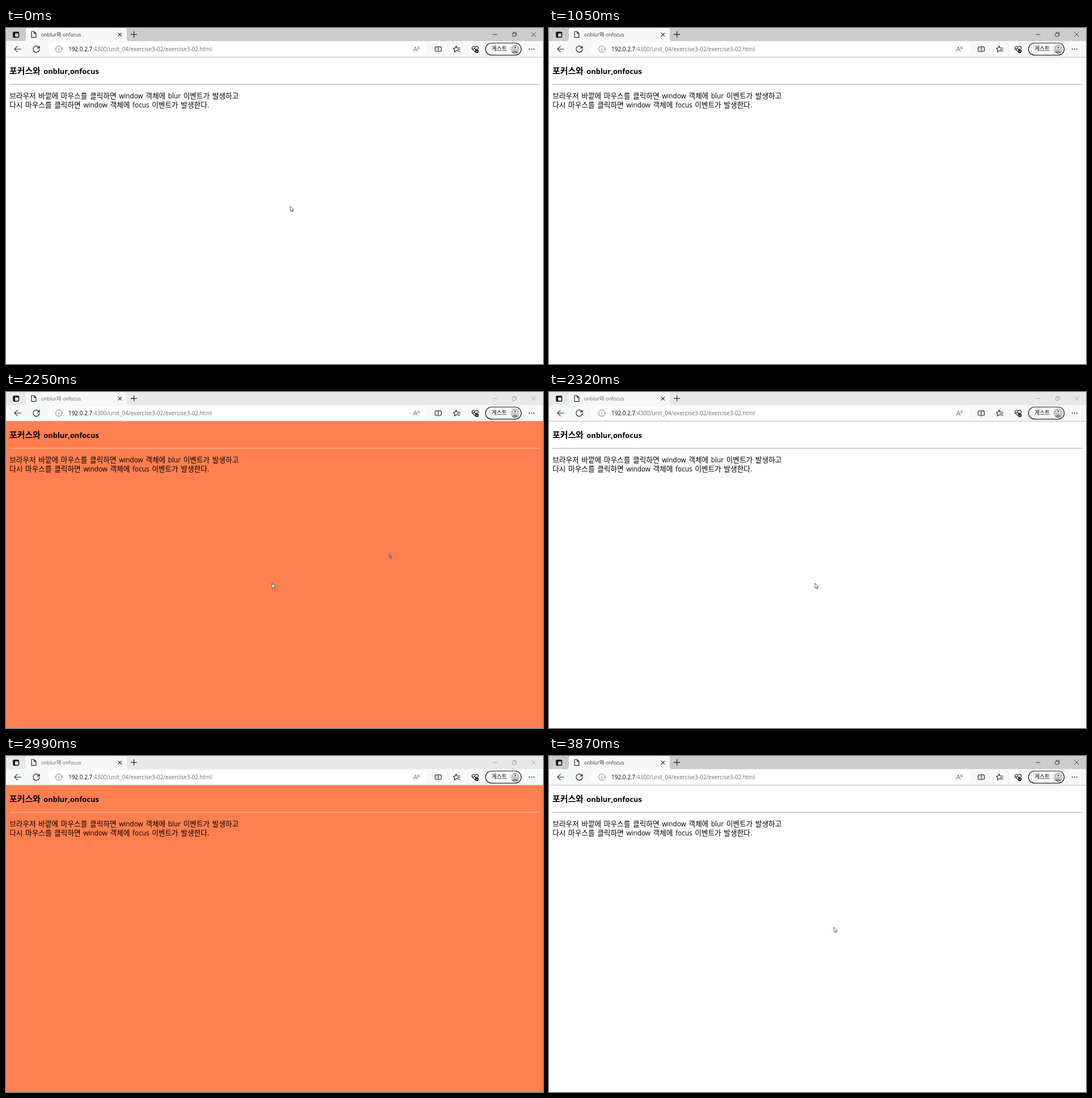
Animation, 947 px wide and 592 px high, one loop 5260 ms. Source, as an HTML page:

```html
<!DOCTYPE html>
<html lang="ko">
<head>
<meta charset="utf-8">
<title>onblur와 onfocus</title>
<style>
  html, body { margin: 0; width: 100%; height: 100%; overflow: hidden; background: #fff; }
  svg { display: block; width: 947px; height: 592px; }
  text { font-family: "Open Sans", "Noto Sans CJK KR", "Noto Sans CJK", sans-serif; fill: #000; white-space: pre; }

  .icon { fill: none; stroke: #222; stroke-width: 1.15; stroke-linecap: round; stroke-linejoin: round; }
  .thin { stroke-width: .9; }
  .body { font-size: 12.65px; word-spacing: 1.35px; }
  .body tspan { font-size: 11.75px; }
  .head { font-size: 14.9px; font-weight: 700; word-spacing: 1.6px; }
  .head tspan { font-size: 12.9px; }
  .tab-title { font-size: 9.3px; }
  .tab-title tspan { font-size: 8.7px; }
  .url { font-size: 10px; }

  .page, .rule, .edge, .bar, .tab-title, .controls, .cursor, .trace {
    animation: 5260ms step-end infinite;
  }
  .page { fill: #fefefe; animation-name: page; }
  .rule { fill: #a9a9a9; animation-name: rule; }
  .edge { fill: #bdbdbd; animation-name: edge; }
  .bar { fill: #ccc; animation-name: bar; }
  .tab-title { fill: #333; animation-name: title; }
  .controls { stroke: #333; animation-name: controls; }
  .cursor { animation-name: cursor; }
  .trace { visibility: hidden; animation-name: trace; }

  /* The page recolours on blur and focus; the title bar follows */
  @keyframes page {
    0%, 44.1%, 72.23% { fill: #fefefe; }
    27.75%, 56.83% { fill: #ff7f50; }
  }
  @keyframes rule {
    0%, 44.1%, 72.23% { fill: #a9a9a9; }
    27.75%, 56.83% { fill: #f5c3ae; }
  }
  @keyframes edge {
    0%, 44.1%, 72.23% { fill: #bdbdbd; }
    27.75%, 56.83% { fill: #d9a692; }
  }
  @keyframes bar {
    0%, 45.39%, 73.56% { fill: #ccc; }
    29.08%, 56.83% { fill: #e8e8e8; }
  }
  @keyframes title {
    0%, 45.39%, 73.56% { fill: #333; }
    29.08%, 56.83% { fill: #666; }
  }
  @keyframes controls {
    0%, 45.39%, 73.56% { stroke: #333; }
    29.08%, 56.83% { stroke: #a0a0a0; }
  }
  @keyframes cursor {
    0% { transform: translate(501.5px, 314px); }
    12.35% { transform: translate(495px, 313px); animation-timing-function: steps(4); }
    19.95% { transform: translate(960px, 301px); }
    34.02% { transform: translate(792px, 257px); animation-timing-function: steps(2); }
    36.51% { transform: translate(675.5px, 284px); animation-timing-function: steps(5); }
    42.77% { transform: translate(469px, 337px); }
    45.39% { transform: translate(490px, 330px); animation-timing-function: steps(3); }
    49.23% { transform: translate(960px, 270px); }
    62.16% { transform: translate(826px, 236px); animation-timing-function: steps(7); }
    70.9%, 100% { transform: translate(502.5px, 301.5px); }
  }
  @keyframes trace {
    0%, 44.1% { visibility: hidden; }
    37.76% { visibility: visible; }
  }
</style>
</head>
<body>
<svg viewBox="0 0 947 592" xmlns="http://www.w3.org/2000/svg">
  <defs>
    <path id="arrow" d="M0 0V8.8L2 7L3.3 9.9L4.7 9.3L3.4 6.5H6.2Z"/>
  </defs>

  <!-- Page -->
  <rect class="page" y="51" width="947" height="541"/>
  <text class="head" x="6" y="81">포커스와 <tspan>onblur,onfocus</tspan></text>
  <rect class="rule" x="6" y="98.7" width="935" height="1"/>
  <text class="body" x="6.2" y="124">브라우저 바깥에 마우스를 클릭하면 <tspan>window</tspan> 객체에 <tspan>blur</tspan> 이벤트가 발생하고</text>
  <text class="body" x="6.2" y="140">다시 마우스를 클릭하면 <tspan>window</tspan> 객체에 <tspan>focus</tspan> 이벤트가 발생한다.</text>

  <!-- Title bar -->
  <rect class="bar" width="947" height="24"/>
  <rect y="23" width="947" height="28.5" fill="#f7f8f8"/>
  <rect class="edge" y="51" width="947" height="1"/>
  <path d="M32 23Q35 23 35 19V4Q35 0 39 0H209Q213 0 213 4V19Q213 23 216 23Z" fill="#f7f8f8"/>
  <g class="icon">
    <rect x="12.9" y="7.1" width="9.6" height="9.2" rx="1.6" stroke="#000" stroke-width="1.4"/>
    <path d="M13.4 8.5H22M14.8 9V15.8" stroke="#000" stroke-width="2.2"/>
    <path d="M45 6.2H49.6L53 9.6V16.6H45ZM49.6 6.2V9.6H53"/>
    <path d="M198 8.8L203.6 14.4M203.6 8.8L198 14.4"/>
    <path d="M220.6 11.3H230.6M225.6 6.3V16.3"/>
  </g>
  <text class="tab-title" x="62" y="14.6"><tspan>onblur</tspan>와 <tspan>onfocus</tspan></text>
  <g class="icon thin controls">
    <path d="M858.8 11.4H866M926.8 7.8L934 15M934 7.8L926.8 15"/>
    <rect x="893" y="9.2" width="5.6" height="5.6" rx="1"/>
    <path d="M894.8 7.8H898.6Q900 7.8 900 9.2V13"/>
  </g>

  <!-- Toolbar -->
  <rect x="73" y="25.5" width="670" height="23.5" rx="11.75" fill="#fff"/>
  <g class="icon">
    <path d="M26.4 37.2H15.2M20 32.2L15 37.2L20 42.2"/>
    <path d="M58.6 35.2A5.6 5.6 0 1 0 59 37.6M58.9 31.8V35.3H55.4"/>
    <g stroke="#666" class="thin">
      <circle cx="93.2" cy="37.2" r="5.6"/>
      <path d="M93.2 36.7V40M93.2 34.4V34.5"/>
      <path d="M718.4 41.2L721.8 33L725.2 41.2M719.6 38.4H724M726 33.6Q727.2 35 726 36.4M727.8 32.4Q729.8 35 727.8 37.6"/>
    </g>
    <path d="M762.2 32V42.4M760.6 33.4H758Q756.8 33.4 756.8 34.6V40Q756.8 41.2 758 41.2H760.6M763.8 33.4H766.4Q767.6 33.4 767.6 34.6V40Q767.6 41.2 766.4 41.2H763.8"/>
    <path d="M796.6 38.6L793.8 40.4L790.6 42.2L791.3 38.4L788.8 35.7L792.2 35.2L793.8 31.8L795.4 35.2H800.4M797 38H800.6M796.8 41H800.6"/>
    <path d="M827 41.8L822.6 37.3Q820.8 35 822.6 33.1Q825 31.2 827.4 33.6Q830 31.2 832.2 33.2Q833.8 35 832.4 36.8M821.6 37H824.6L826 34.8L828 38.8L829 37H831"/>
  </g>
  <circle cx="830.4" cy="41" r="3.2" fill="#222"/>
  <path d="M829 41L830.1 42.1L832 40" fill="none" stroke="#fff" stroke-width=".8"/>
  <text class="url" x="110" y="41">192.0.2.7<tspan fill="#707070">:4300/unit_04/exercise3-02/exercise3-02.html</tspan></text>

  <rect x="845.6" y="26.5" width="63" height="21.4" rx="10.7" fill="#f7f8f8" stroke="#222" stroke-width="1.2"/>
  <text x="856.2" y="40.4" font-size="9.8">게스트</text>
  <circle cx="897.8" cy="37.2" r="8.2" fill="#cfcdcb"/>
  <path d="M892 43Q892.4 40.4 895 40.4H900.6Q903.2 40.4 903.6 43Q901 45.4 897.8 45.4Q894.6 45.4 892 43Z" fill="#8c8987"/>
  <circle cx="897.8" cy="35.2" r="4.2" fill="#f1f0ef" stroke="#8c8987" stroke-width=".8"/>
  <text x="896.1" y="37.8" font-size="7" font-weight="700" fill="#666">?</text>
  <g fill="#222">
    <circle cx="922.8" cy="37.3" r="1"/>
    <circle cx="926.8" cy="37.3" r="1"/>
    <circle cx="930.8" cy="37.3" r="1"/>
  </g>

  <!-- Pointer -->
  <g class="trace"><use href="#arrow" x="675.5" y="284" fill="#7f7f7f" stroke="#7f7f7f" stroke-width=".8"/></g>
  <g class="cursor"><use href="#arrow" fill="#fff" stroke="#333" stroke-width=".8" stroke-linejoin="round"/></g>
</svg>
</body>
</html>
```
